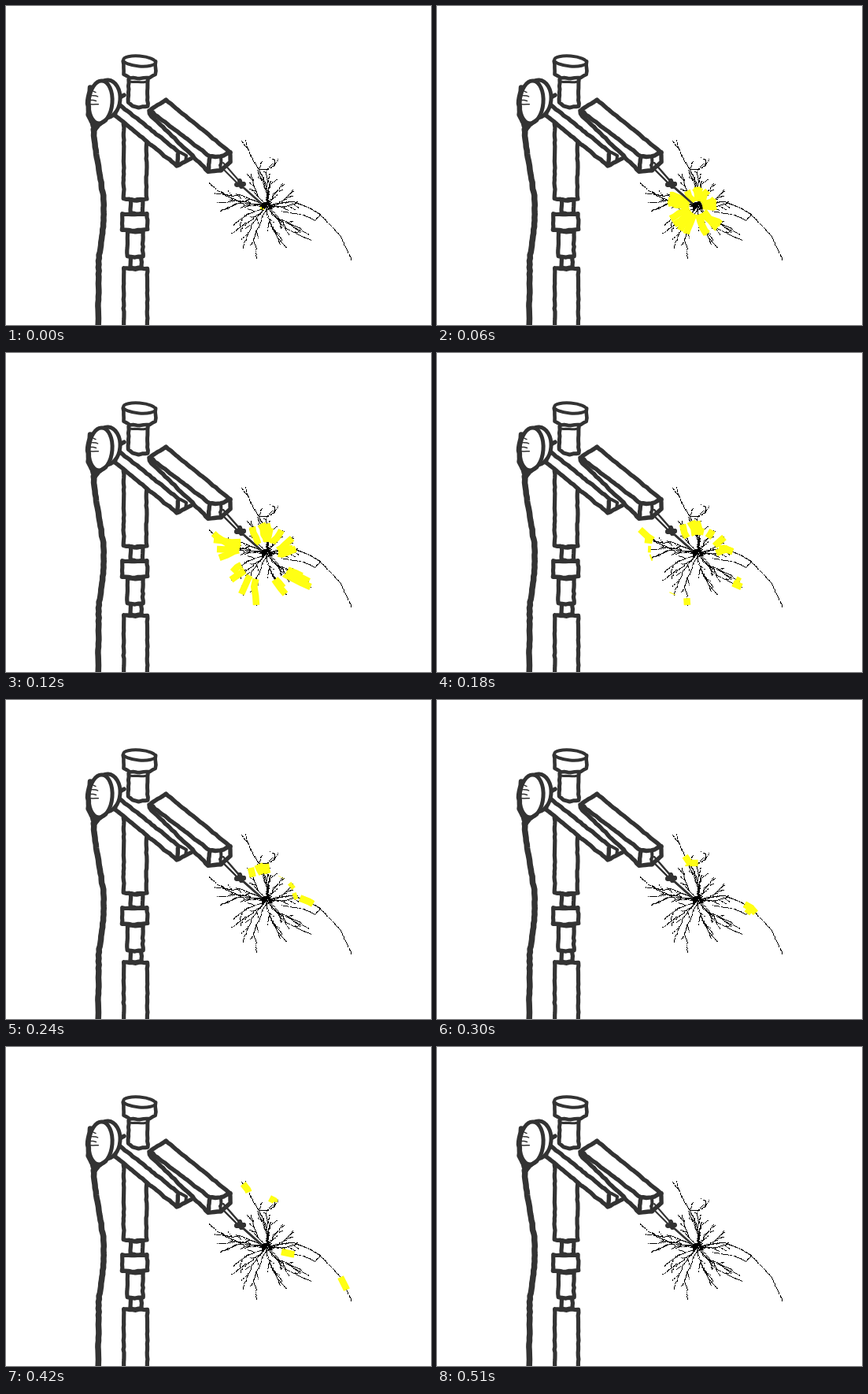
Animation, 540 px wide and 405 px high, one loop 1920 ms. Source, as an HTML page with a canvas:

```html
<!DOCTYPE html>
<html lang="en">
<head>
<meta charset="utf-8">
<title>Neuron recording</title>
<style>
html, body { margin: 0; width: 100%; height: 100%; overflow: hidden; background: #fff; }
canvas { display: block; width: 540px; height: 405px; }
</style>
</head>
<body>
<canvas id="stage" width="540" height="405"></canvas>
<script>
const W = 540, H = 405, LOOP = 1920, STEP = 30, LAST = 17;
const INK = '#333', YELLOW = '#ffff14';
const ctx = document.getElementById('stage').getContext('2d');
const still = document.createElement('canvas');
still.width = W;
still.height = H;
const pen = still.getContext('2d');

let seed = 7;
function rnd() {
  seed = (seed * 16807) % 2147483647;
  return seed / 2147483647;
}
const jit = a => (rnd() - 0.5) * a;

// "x,y x,y" -> [[x, y], ...]
const pts = s => s.split(' ').map(p => p.split(',').map(Number));

function walk(path, gap, visit) {
  for (let i = 1; i < path.length; i++) {
    const [ax, ay] = path[i - 1], [bx, by] = path[i];
    const n = Math.max(1, Math.round(Math.hypot(bx - ax, by - ay) / gap));
    for (let k = 0; k < n; k++) visit(ax + (bx - ax) * k / n, ay + (by - ay) * k / n);
  }
  visit(...path[path.length - 1]);
}

// Hand-inked line; a filled one hides what lies behind it
function ink(path, width = 5.4, filled = false) {
  pen.beginPath();
  walk(path, 4, (x, y) => pen.lineTo(x + jit(1), y + jit(1)));
  pen.fillStyle = '#fff';
  if (filled) pen.fill();
  pen.lineWidth = width;
  pen.stroke();
}
const line = (s, width) => ink(pts(s), width);
const face = (s, width) => ink(pts(s), width, true);

function tube(x, half, top, bottom) {
  const l = x - half, r = x + half;
  ink([[l, top], [x, top + 1], [r, top], [r, bottom], [x, bottom + 1], [l, bottom], [l, top]], 5.2, true);
}

function oval(x, y, rx, ry, width) {
  pen.beginPath();
  pen.ellipse(x, y, rx, ry, 0.08, 0, Math.PI * 2);
  pen.fillStyle = '#fff';
  pen.fill();
  pen.lineWidth = width;
  pen.stroke();
}

function drawRig() {
  pen.strokeStyle = INK;
  pen.lineJoin = pen.lineCap = 'round';

  // column
  tube(164, 14.5, 150, 245);
  tube(166, 7.5, 246, 263);
  tube(165, 7, 318, 332);
  tube(164, 9.8, 286, 318);
  tube(163.5, 16, 264, 284);
  tube(164.5, 15, 333, 412);

  // lower arm
  face('150,113 139,121 139,139 217,203 235,194');
  line('139,121 219,185 218,202');
  line('220,185 229,190 228,197', 4);

  // stem and knob
  face('156,93 155,122 161,127 169,129 180,127 180,93', 5);
  line('157,96 168,97 179,96', 3);
  face('149,70 150,87 158,91 170,92 183,91 190,87 190,70', 4.6);
  oval(169.5, 70, 20.5, 6.5, 4);

  // upper arm
  face('182,133 203,119 285,186 285,198 273,209 257,210 182,137 182,133');
  line('183,133 259,191 273,191 285,186');
  line('259,191 257,209');
  line('273,191 273,209', 4);

  // disc and cable
  oval(128, 118, 17, 24, 5);
  oval(120, 122, 15, 27, 5);
  line('107,104 104,120 105,138 111,150', 6.5);
  for (let i = 0; i < 4; i++) line(`107,${107 + i * 6} ${114 + (i % 2) * 3},${110 + i * 5}`, 1.5);
  line('109,150 119,150 126,145', 5);
  line('110,152 117,152 112,159', 6);
  line('111,157 113,175 120,220 124,245 124,276 118,320 117,405', 7.5);
}

// A dendrite bows away from the straight way to its tip
const SOMA = [331, 254];
function dendrite([x, y]) {
  const dx = x - SOMA[0], dy = y - SOMA[1], bow = jit(0.22);
  return Array.from({ length: 7 }, (_, i) => {
    const t = i / 6, b = (bow + jit(0.08)) * Math.sin(Math.PI * t);
    return [SOMA[0] + dx * t - dy * b, SOMA[1] + dy * t + dx * b];
  });
}
const fan = tips => pts(tips).map(dendrite);
const route = s => [SOMA, ...pts(s)];
const rising = '333,240 328,222 321,207 ';
const axonWay = '345,250 365,248 385,256 399,264 ';

// lo and hi: stretch of each path, in pixels from the cell body, lit at step s
const groups = [
  {
    paths: fan('258,224 264,237 268,249 271,260 288,278 299,306 318,320 286,288 355,306 387,297 385,290 352,298 376,283'),
    lo: s => 12.4 * s - 14,
    hi: s => 18 * s + 2,
    twigs: 3
  },
  {
    paths: [
      route(rising + '313,195 307,181 299,171'),
      route(rising + '332,207 340,202 341,195 335,192'),
      ...fan('311,213 319,208 330,208 336,222 350,225 365,234 370,248')
    ],
    lo: s => 3 * s + 0.17 * s * s,
    hi: s => Math.min(12 * s, 3 * s + 0.17 * s * s + Math.max(13, 36 - 3 * s)),
    twigs: 4
  },
  {
    paths: [
      route(axonWay + '412,278 425,292 432,306 439,322'),
      route(axonWay + '393,272 378,265 364,263 350,260')
    ],
    lo: s => 2.3 * s + 0.4 * s * s,
    hi: s => 2.3 * s + 0.4 * s * s + 18,
    twigs: 0
  }
];

function fibre(path, skip) {
  let drift = 0;
  walk(path, 0.8, (x, y) => {
    drift = drift * 0.9 + jit(0.9);
    if (rnd() > skip) pen.fillRect(Math.round(x + drift), Math.round(y + drift * 0.6), 1, 1);
  });
}

function drawCell() {
  pen.fillStyle = '#000';
  for (const g of groups) for (const p of g.paths) {
    fibre(p, 0.12);
    for (let i = 0; i < g.twigs; i++) {
      const [x, y] = p[2 + i % (p.length - 3)];
      const a = Math.atan2(y - SOMA[1], x - SOMA[0]) + jit(1.6), r = 6 + rnd() * 6;
      fibre([[x, y], [x + Math.cos(a) * r, y + Math.sin(a) * r]], 0.25);
    }
  }
  for (let i = 0; i < 90; i++) {
    const a = rnd() * Math.PI * 2, r = rnd() * 7;
    pen.fillRect(Math.round(333 + Math.cos(a) * r), Math.round(252 + Math.sin(a) * r), 2, 1);
  }
}

function drawProbe(c) {
  const seg = (x1, y1, x2, y2, w) => {
    c.lineWidth = w;
    c.beginPath();
    c.moveTo(x1, y1);
    c.lineTo(x2, y2);
    c.stroke();
  };
  c.strokeStyle = INK;
  c.lineCap = 'round';
  seg(271, 202, 295, 226, 2);
  seg(276, 199, 297, 223, 2);
  seg(293, 227, 302, 226, 6);
  seg(297, 222, 299, 229, 6);
  seg(300, 229, 327, 253, 2.5);
  c.fillStyle = '#000';
  c.fillRect(323, 252, 9, 3);
  c.fillRect(325, 250, 4, 7);
}

// Stroke only the part of a path between two distances
function stretch(path, lo, hi) {
  let d = 0, open = false;
  ctx.beginPath();
  for (let i = 1; i < path.length; i++) {
    const [ax, ay] = path[i - 1], [bx, by] = path[i];
    const len = Math.hypot(bx - ax, by - ay);
    const a = Math.max(0, lo - d) / len, b = Math.min(len, hi - d) / len;
    if (a < b) {
      if (!open) ctx.moveTo(ax + (bx - ax) * a, ay + (by - ay) * a);
      ctx.lineTo(ax + (bx - ax) * b, ay + (by - ay) * b);
      open = true;
    }
    d += len;
  }
  if (open) ctx.stroke();
}

function drawPulse(s) {
  ctx.fillStyle = ctx.strokeStyle = YELLOW;
  if (s === 0) {
    ctx.fillRect(323, 255, 2, 3);
    ctx.fillRect(326, 257, 2, 2);
    return;
  }
  ctx.lineCap = 'butt';
  ctx.lineJoin = 'round';
  ctx.lineWidth = 8.5;
  for (const g of groups) for (const p of g.paths) stretch(p, g.lo(s), g.hi(s));
  drawProbe(ctx);
}

pen.fillStyle = '#fff';
pen.fillRect(0, 0, W, H);
drawRig();
drawCell();
drawProbe(pen);

const start = performance.now();
function frame() {
  const step = Math.floor(((performance.now() - start) % LOOP) / STEP);
  ctx.drawImage(still, 0, 0);
  if (step < LAST) drawPulse(step);
  requestAnimationFrame(frame);
}
frame();
</script>
</body>
</html>
```
